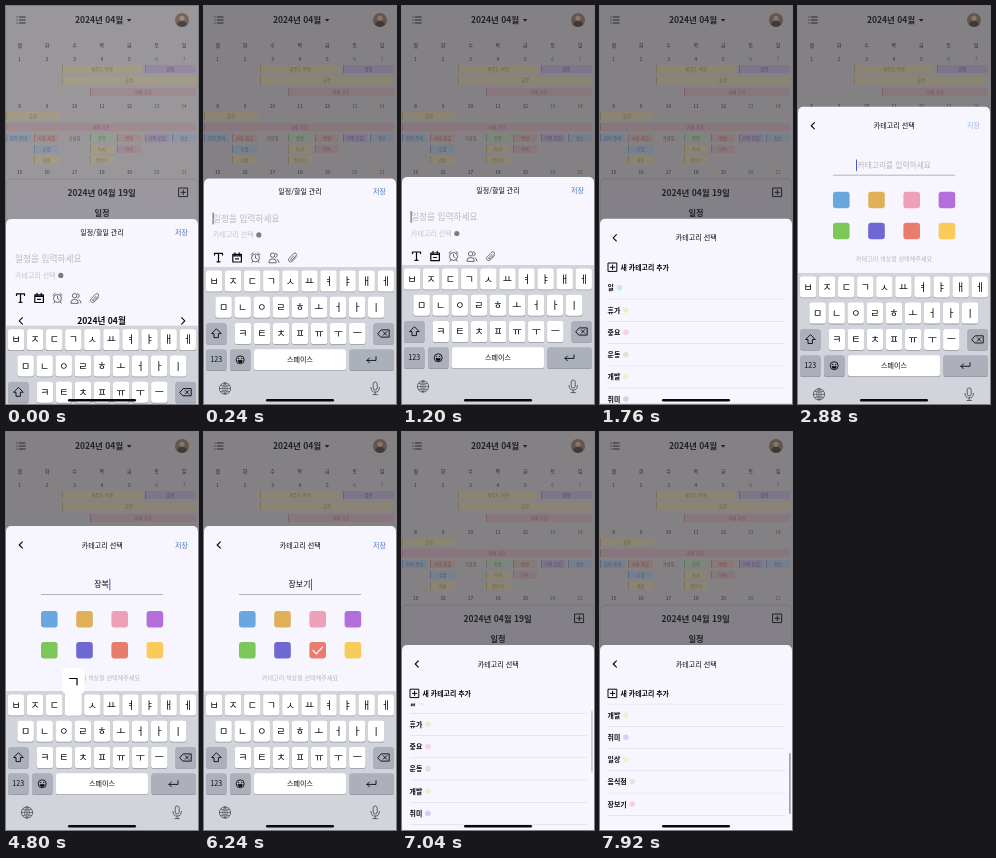
Recreate the animation shown at these times as an HTML page. Size 192x398 px, loop 8 s.

```html
<!DOCTYPE html>
<html lang="ko">
<head>
<meta charset="utf-8">
<title>카테고리 추가</title>
<style>
html, body { margin: 0; width: 100%; height: 100%; overflow: hidden; background: #848287; }
svg { display: block; width: 100vw; height: 100vh; }
text { font-family: "Noto Sans CJK KR", "Noto Sans CJK JP", "Noto Sans", sans-serif; }
</style>
</head>
<body>
<svg id="stage" viewBox="0 0 192 398" preserveAspectRatio="none"></svg>
<script>
const LOOP = 8000;
const INK = '#08080b', SHEET = '#f7f6fe', BLUE = '#4a78c4';

// --- markup helpers ---
const attrs = o => Object.entries(o).map(([k, v]) => ` ${k}="${v}"`).join('');
const rect = (x, y, w, h, fill, r = 0, o = {}) =>
  `<rect x="${x}" y="${y}" width="${w}" height="${h}" rx="${r}" fill="${fill}"${attrs(o)}/>`;
const dot = (x, y, r, fill) => `<circle cx="${x}" cy="${y}" r="${r}" fill="${fill}"/>`;
const ring = (x, y, r, stroke) =>
  `<circle cx="${x}" cy="${y}" r="${r}" fill="none" stroke="${stroke}" stroke-width=".9"/>`;
const line = (d, color = INK, w = 1, o = {}) =>
  `<path d="${d}" fill="none" stroke="${color}" stroke-width="${w}" stroke-linecap="round" stroke-linejoin="round"${attrs(o)}/>`;
const text = (x, y, s, size, fill = INK, weight = 400, anchor = 'middle', o = {}) =>
  `<text x="${x}" y="${y + size * 0.37}" font-size="${size}" fill="${fill}" font-weight="${weight}" text-anchor="${anchor}"${attrs(o)}>${s}</text>`;
const left = (x, y, s, size, fill, weight, o) => text(x, y, s, size, fill, weight, 'start', o);
const group = (id, body, o = {}) => `<g id="${id}"${attrs(o)}>${body}</g>`;
const back = (x, y, dir = 1) => line(`M${x + 1.6 * dir} ${y - 3.2}l${-3.2 * dir} 3.2l${3.2 * dir} 3.2`, INK, 1.1);
const plusBox = (x, y, s, color) =>
  line(`M${x} ${y}h${s}v${s}h${-s}zM${x + s / 2} ${y + 2}v${s - 4}M${x + 2} ${y + s / 2}h${s - 4}`, color, 1);

// --- calendar page behind the sheet ---
const TINT = {
  y: ['#a39b86', '#75673f'], p: ['#9e8b92', '#84505c'], v: ['#9389a2', '#5d4c80'],
  b: ['#8b95a4', '#405c80'], g: ['#919e90', '#44683f'], r: ['#a08e8e', '#854c4a']
};
function bar(x, y, w, tint, label) {
  const [fill, ink] = TINT[tint];
  return rect(x, y, w, 8, fill, 0.6) + rect(x, y, 0.8, 8, ink, 0, { opacity: 0.5 }) +
    text(x + w / 2, y + 4, label, 4.4, ink, 400, 'middle', { opacity: 0.8 });
}
function calendar() {
  const col = i => 13.7 + i * 27.4, ink = '#28272c';
  let s = rect(0, 0, 192, 398, '#9a979b');
  for (let i = 0; i < 3; i++) s += dot(11, 11 + i * 3, 0.6, ink) + line(`M13.2 ${11 + i * 3}h6`, ink, 0.9);
  s += text(93, 14, '2024년 04월', 8.5, ink, 700) + `<path d="M120.8 13h4.6l-2.3 2.8z" fill="${ink}"/>`;
  s += dot(176, 14, 7, '#75655c') + dot(176, 12.3, 2.6, '#a08a7c') + '<path d="M171 18.8a5 4 0 0 1 10 0a7 7 0 0 1-10 0z" fill="#4a4444"/>';
  [...'월화수목금토일'].forEach((d, i) => s += text(col(i), 39.5, d, 5, '#333238', 500));
  [53, 100, 166].forEach((y, w) => {
    for (let i = 0; i < 7; i++)
      s += text(col(i), y, w * 7 + i + 1, 4.8, i > 5 ? '#80484c' : i > 4 ? '#48587c' : '#3a393e');
  });
  const bars = [
    [56, 59, 80, 'y', '제주도 여행'], [139, 59, 51, 'v', '캠핑'], [56, 70.5, 134, 'y', '출장'], [84, 82, 106, 'p', '과제 기간'],
    [0, 106, 54, 'y', '출장'], [0, 117, 190, 'p', '과제 기간'],
    [0, 128, 25, 'b', '회의 준비'], [28, 128, 25, 'r', '서류 제출'], [84, 128, 24, 'g', '운동'],
    [111, 128, 24, 'r', '병원'], [139, 128, 24, 'v', '가족 모임'], [166, 128, 24, 'b', '청소'],
    [28, 139, 25, 'b', '수업'], [84, 139, 24, 'y', '독서'], [111, 139, 24, 'p', '약속'],
    [28, 150, 25, 'y', '개발'], [84, 150, 24, 'y', '장보기']
  ];
  s += bars.map(b => bar(...b)).join('') + text(68.5, 132, '기념일', 4.4, '#854c4a');
  s += '<path d="M0 398V179Q0 173 6 173H186Q192 173 192 179V398z" fill="#9a989e" stroke="#86848a" stroke-width=".8"/>';
  s += text(95.7, 187, '2024년 04월 19일', 8.5, ink, 700) + plusBox(173, 182, 8.6, ink);
  return s + text(96, 207, '일정', 8.2, ink, 700) + rect(0, 0, 192, 398, '#000', 0, { id: 'shade' });
}

// --- sheet pages, drawn relative to the sheet top ---
const caret = (id, x, y, color) => rect(x, y - 6, 1, 12, color, 0.4, { id });

function eventPage() {
  const soft = '#55545c';
  return text(96, 13.5, '일정/할일 관리', 7, INK, 500) + text(175.5, 13.5, '저장', 7, BLUE, 500) +
    left(9, 40, '일정을 입력하세요', 8.7, '#b9b8c1') + caret('eventCaret', 8.6, 40, '#55545e') +
    left(9, 56.5, '카테고리 선택', 7, '#c3c2ca') + dot(54.8, 56.5, 2.6, '#7d7c84') +
    line('M10.5 76.6v-1.6h8v1.6M14.5 75v8.4M13 83.4h3', INK, 1.2) +
    line('M28.8 76h8.6v7.6h-8.6zM31 74.4v2M35.2 74.4v2M28.8 77.5h8.6M31.5 80.5h3', INK, 1.2) +
    ring(51.5, 79.5, 4, soft) +
    line('M51.5 77.2v2.5l1.6 1M47 76.2l2-1.8M56 76.2l-2-1.8M48.8 83l-1 1.2M54.2 83l1 1.2', soft, 0.9) +
    ring(68.6, 76.8, 2.2, soft) +
    line('M65 84v-1q0-2.4 3.6-2.4t3.6 2.4v1zM71.6 74.8a2.1 2.1 0 0 1 0 4.1M73 80.8q2 .6 2 3.2', soft, 0.9) +
    line('M92.5 78.5l-4 4.3q-1.8 1.6-3.4.2t.2-3.4l4.4-4.5q1.3-1 2.4 0t0 2.4l-4.2 4.3q-1.2.6-1.4-.7l3.5-3.7', soft, 0.8) +
    back(14.8, 102) + back(177.2, 102, -1) + text(95.5, 102, '2024년 04월', 8.6, INK, 700);
}

const ROWS = [['일', '#c4e6f8'], ['휴가', '#f4ebc6'], ['중요', '#f8d3da'], ['운동', '#dfe2d6'], ['개발', '#f4eecb'],
  ['취미', '#dccbef'], ['일상', '#f8efc6'], ['음식점', '#e9e5d6'], ['장보기', '#fccfd3']];
const PITCH = 22.25;

function listPage() {
  const rows = ROWS.map(([name, color], i) => {
    const y = 69 + i * PITCH;
    return group('row' + i, left(7.6, y, name, 6.9, INK, 700) + dot(13.3 + name.length * 6.3, y, 2.8, color) +
      rect(8, y + 11, 177, 0.6, '#dcdbe4'));
  }).join('');
  return back(14.8, 19) + text(96.3, 19, '카테고리 선택', 7.1, INK) +
    plusBox(8.4, 44.2, 8.4, INK) + left(20.6, 48.5, '새 카테고리 추가', 6.9, INK, 700) +
    `<g clip-path="url(#listClip)">${group('rows', rows)}</g>` +
    rect(189, 59, 1.8, 61, '#a5a4ac', 0.9, { id: 'thumb' });
}

const SWATCHES = ['#68a8df', '#dfb056', '#eea0b9', '#b36edb', '#7cc757', '#6d68d3', '#e87c6d', '#f8cb5b'];

function formPage() {
  const squares = SWATCHES.map((c, i) => rect(35 + (i % 4) * 35.2, i < 4 ? 85 : 116, 16.6, 16.6, c, 3)).join('');
  return back(14.8, 19) + text(96.3, 19, '카테고리 선택', 7.1, INK, 500) +
    text(175.5, 19, '저장', 7, BLUE, 500, 'middle', { id: 'save' }) +
    left(59.5, 58.5, '카테고리를 입력하세요', 7.75, '#b4b3bc', 400, { id: 'hint' }) +
    text(95.5, 58.5, '', 7.9, INK, 500, 'middle', { id: 'typed' }) + caret('formCaret', 0, 58.5, '#4b57c8') +
    rect(35, 68, 122, 0.8, '#a5a4ad') + squares +
    line('M109 124.5l3.3 3.3l6.4-7', '#fff', 1.2, { id: 'check' }) +
    text(96, 151.5, '카테고리 색상을 선택해주세요', 6.1, '#b6b5be');
}

// --- keyboard, drawn relative to its top ---
const KEYS = [['ㅂㅈㄷㄱㅅㅛㅕㅑㅐㅔ', 10.1, 3.5], ['ㅁㄴㅇㄹㅎㅗㅓㅏㅣ', 19.6, 29.7], ['ㅋㅌㅊㅍㅠㅜㅡ', 38.9, 56]];
const keyPos = {};
const cap = (x, y, w, fill) => rect(x, y + 0.8, w, 21, '#94969d', 2.6) + rect(x, y, w, 21, fill, 2.6);

function keyboard() {
  const gray = '#abb0bb', dim = '#50535b';
  let s = rect(0, 0, 192, 150, '#d2d4dc');
  for (const [chars, x0, y] of KEYS)
    [...chars].forEach((c, i) => {
      const x = x0 + i * 19.07;
      keyPos[c] = [x, y];
      s += cap(x - 8.2, y, 16.4, '#fff') + text(x, y + 10.5, c, 10);
    });
  s += cap(2, 56, 20.5, gray) + line('M12.2 62l-4.6 4.6h2.4v4h4.4v-4h2.4z', INK, 0.9);
  s += cap(169.5, 56, 20.5, gray) + line('M174 66.5l3.2-3.6h8v7.2h-8zM179.3 64.8l3.4 3.4M182.7 64.8l-3.4 3.4', INK, 0.9);
  s += cap(2, 82.3, 20.5, gray) + text(12.2, 92.8, '123', 7);
  s += cap(26, 82.3, 20.5, gray) + ring(36.2, 92.8, 4, INK) + dot(34.7, 91.6, 0.7, INK) + dot(37.7, 91.6, 0.7, INK) +
    '<path d="M33.6 93.3h5.2q-.4 2.6-2.6 2.6t-2.6-2.6z"/>';
  s += cap(50, 82.3, 92, '#fff') + text(96, 92.8, '스페이스', 7);
  s += cap(145.5, 82.3, 44.5, gray) + line('M172 89.8v3.6h-9M165.4 91l-2.4 2.4l2.4 2.4', INK, 0.9);
  s += ring(21, 121.5, 5.6, dim) +
    line('M15.4 121.5h11.2M21 115.9v11.2M21 115.9q-5 5.6 0 11.2q5-5.6 0-11.2M16.6 118.5q4.4 1.6 8.8 0M16.6 124.5q4.4-1.6 8.8 0', dim, 0.7);
  s += rect(169.2, 115, 4, 8, 'none', 2, { stroke: dim, 'stroke-width': 0.9 }) +
    line('M167 120.5q0 4.6 4.2 4.6t4.2-4.6M171.2 125.1v2.5M169 127.6h4.4', dim, 0.9);
  return s + group('bubble', rect(-11, -26, 22, 25, '#fff', 4) + rect(-8.2, -6, 16.4, 27, '#fff', 2.6) +
    text(0, -13.5, '', 15, INK, 400, 'middle', { id: 'bubbleChar' }));
}

const stage = document.getElementById('stage');
stage.innerHTML = '<defs><clipPath id="listClip"><rect x="0" y="58.5" width="192" height="140"/></clipPath></defs>' +
  calendar() +
  group('sheet', `<path d="M0 400V5.5Q0 0 5.5 0H186.5Q192 0 192 5.5V400z" fill="${SHEET}"/>` +
    group('event', eventPage()) + group('list', listPage()) + group('form', formPage())) +
  group('keys', keyboard()) + rect(62, 393, 68, 2.4, '#08080a', 1.2);

const el = {};
stage.querySelectorAll('[id]').forEach(n => el[n.id] = n);

// --- timing ---
const clamp = v => Math.min(1, Math.max(0, v));
const ramp = (t, from, ms) => clamp((t - from) / ms);
const spring = t => t <= 0 ? 0 : 1 - (1 + 0.018 * t) * Math.exp(-0.018 * t);
const shift = (n, x, y) => n.setAttribute('transform', `translate(${x} ${y})`);
const show = (n, v) => {
  n.setAttribute('opacity', v);
  n.setAttribute('display', v > 0 ? 'inline' : 'none');
};
const blink = t => {
  const p = ((t % 1000) + 1000) % 1000;
  return p < 550 ? 1 : p < 650 ? 1 - (p - 550) / 100 : p < 900 ? 0 : (p - 900) / 100;
};

const STROKES = [[3920, 'ㅈ', 'ㅈ'], [4080, 'ㅏ', '자'], [4240, 'ㅇ', '장'], [4400, 'ㅂ', '장ㅂ'],
  [4640, 'ㅗ', '장보'], [4800, 'ㄱ', '장복'], [4960, 'ㅣ', '장보기']];
const CLOSE_EVENT = 1340, OPEN_FORM = 2626, PICK = 5600, SAVE = 6280;

function draw(t) {
  const a = spring(t + 104), b = spring(t - CLOSE_EVENT), c = spring(t - OPEN_FORM), d = spring(t - SAVE);
  shift(el.keys, 0, 398 - 139 * (a - b + c - d));
  shift(el.sheet, 0, 267 - 96 * a + 42 * b - 119 * c + 119 * d);
  show(el.shade, 0.15 * ramp(t, 0, 200));

  const toList = ramp(t, CLOSE_EVENT - 20, 140);
  const toForm = ramp(t, OPEN_FORM - 120, 140) - ramp(t, SAVE + 10, 120);
  show(el.event, 1 - toList);
  show(el.list, toList * (1 - toForm));
  show(el.form, toForm);
  show(el.eventCaret, t < 100 ? 0 : blink(t - 100));

  const done = STROKES.filter(s => s[0] <= t);
  const last = done[done.length - 1];
  const word = last ? last[2] : '';
  el.typed.textContent = word;
  show(el.hint, word ? 0 : 1);
  show(el.save, word ? 1 : 0.5);
  el.formCaret.setAttribute('x', word ? 96 + word.length * 3.65 : 58);
  show(el.formCaret, blink(t - (last ? last[0] : 2800)));
  show(el.check, t >= PICK ? 1 : 0);

  const pressed = last && t - last[0] < 110;
  show(el.bubble, pressed ? 1 : 0);
  if (pressed) {
    shift(el.bubble, ...keyPos[last[1]]);
    el.bubbleChar.textContent = last[1];
  }

  const p = 1 - Math.pow(1 - ramp(t, 7000, 860), 3);
  shift(el.rows, 0, -4 * PITCH * p + p);
  el.thumb.setAttribute('y', 59 + 49 * p);
  show(el.thumb, ramp(t, 7000, 80));
  show(el.row8, t >= SAVE ? 1 : 0);
}

const start = performance.now();
function tick() {
  draw((performance.now() - start) % LOOP);
  requestAnimationFrame(tick);
}
tick();
</script>
</body>
</html>
```
